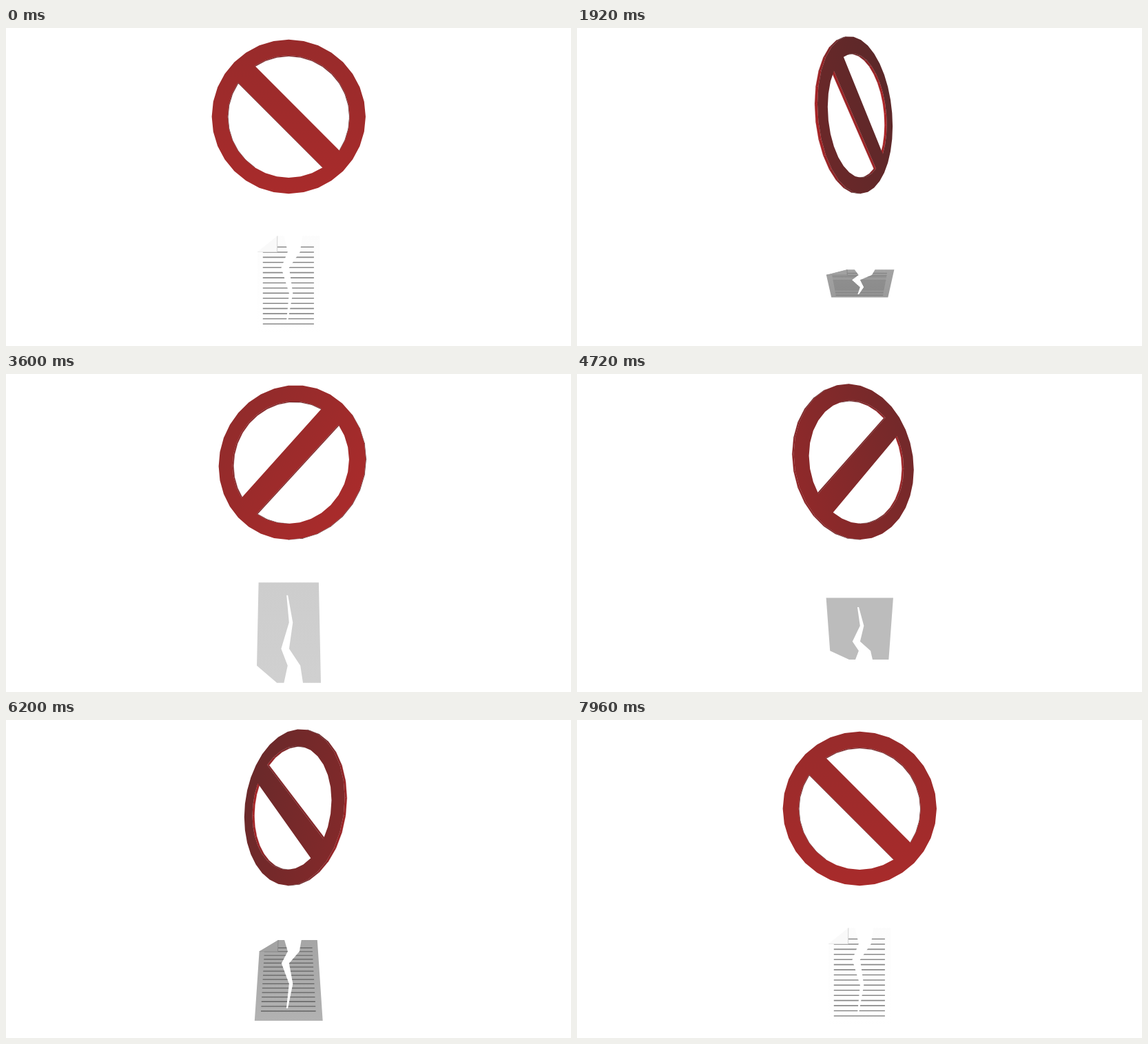
Write an HTML page with a canvas that moves like this. It is 820x461 px and loops after 8 s.

```html
<!DOCTYPE html>
<html lang="en">
<head>
<meta charset="utf-8">
<title>Forbidden sign and torn page</title>
<style>
html, body { margin: 0; width: 100%; height: 100%; overflow: hidden; background: #fff; }
canvas { display: block; width: 820px; height: 461px; }
</style>
</head>
<body>
<canvas id="stage" width="820" height="461"></canvas>
<script>
const ctx = document.getElementById('stage').getContext('2d');
const LOOP = 8000, STEP = 40;
const CX = 410.3, CY = 230.5, DEPTH = 625;
const RAD = Math.PI / 180;

// --- motion: ease in, even speed at the half turn, ease out ---
function ramp(v) {
  const a = 0.39, b = 0.61;
  let lo = 0, hi = 1;
  for (let i = 0; i < 30; i++) {
    const m = (lo + hi) / 2, n = 1 - m;
    if (3 * a * m * n * n + 3 * b * m * m * n + m * m * m < v) lo = m; else hi = m;
  }
  return 3 * b * lo * lo * (1 - lo) + lo ** 3;
}
function turn(ms) {
  const v = 2 * ms / LOOP;
  return v < 1 ? 180 * ramp(v) : 360 - 180 * ramp(2 - v);
}

// --- helpers ---
const project = ([x, y, z]) => {
  const s = DEPTH / (DEPTH - z);
  return [CX + x * s, CY - y * s];
};
const wrap = a => ((a + 540) % 360) - 180;
const rgb = c => `rgb(${c.map(v => Math.max(0, Math.min(255, Math.round(v)))).join()})`;
const gray = v => rgb([v, v, v]);

// keys: [position, ...values]
function lookup(keys, p) {
  let i = 1;
  while (i < keys.length - 1 && p > keys[i][0]) i++;
  const a = keys[i - 1], b = keys[i];
  const f = Math.max(0, Math.min(1, (p - a[0]) / (b[0] - a[0])));
  return a.slice(1).map((v, k) => v + (b[k + 1] - v) * f);
}
function trace(points) {
  points.forEach(([x, y], i) => i ? ctx.lineTo(x, y) : ctx.moveTo(x, y));
  ctx.closePath();
}

// --- sign ---
const R = 111.3, R_IN = 88.3, HALF = 2, SIGN_Y = 101.7;
const arc = (r, from, to) => {
  const pts = [], dir = Math.sign(to - from);
  for (let k = from; k !== to + dir; k += dir) {
    pts.push([r * Math.cos(k * 11.25 * RAD), r * Math.sin(k * 11.25 * RAD)]);
  }
  return pts;
};
const outlines = [arc(R, 0, 31), arc(R_IN, 43, 29), arc(R_IN, 27, 13)];
// face colour by tilt
const FACE = [
  [0, 160, 43, 43], [18, 157, 43, 43], [25, 145, 42, 43],
  [50, 116, 41, 42], [78, 73, 38, 40], [84, 47, 38, 40], [90, 38, 36, 39]
];

function drawSign(deg) {
  const c = Math.cos(deg * RAD), s = Math.sin(deg * RAD);
  const place = (x, y, z) => [x * c + z * s, y + SIGN_Y, z * c - x * s];

  for (const line of outlines) {
    line.forEach((p, i) => {
      const q = line[(i + 1) % line.length];
      const len = Math.hypot(q[0] - p[0], q[1] - p[1]);
      const nx = (q[1] - p[1]) / len, ny = (p[0] - q[0]) / len;
      const [mx, my, mz] = place((p[0] + q[0]) / 2, (p[1] + q[1]) / 2, 0);
      const lit = (-nx * c * mx - ny * my - nx * s * (DEPTH - mz)) / Math.hypot(mx, my, DEPTH - mz);
      if (lit <= 0) return;
      ctx.beginPath();
      trace([place(...p, HALF), place(...q, HALF), place(...q, -HALF), place(...p, -HALF)].map(project));
      ctx.fillStyle = ctx.strokeStyle = rgb([48 + 130 * Math.sqrt(lit), 37, 39]);
      ctx.lineWidth = 0.3;
      ctx.fill();
      ctx.stroke();
    });
  }

  const side = c * DEPTH > HALF ? 1 : c * DEPTH < -HALF ? -1 : 0;
  if (!side) return;
  const base = lookup(FACE, Math.acos(Math.abs(c)) / RAD);
  const gx = -34 * s * c, gy = 8 * Math.abs(c);
  const g = Math.hypot(gx, gy) || 1;
  const ux = gx / g * R, uy = gy / g * R;
  const [ox, oy] = project([0, SIGN_Y, 0]);
  const paint = ctx.createLinearGradient(ox - ux, oy - uy, ox + ux, oy + uy);
  paint.addColorStop(0, rgb([base[0] - g, base[1], base[2]]));
  paint.addColorStop(1, rgb([base[0] + g, base[1], base[2]]));
  ctx.beginPath();
  for (const line of outlines) trace(line.map(p => project(place(...p, HALF * side))));
  ctx.fillStyle = paint;
  ctx.fill('evenodd');
}

// --- page ---
const H = 71, PAGE_Y = -142;
const sheet = [
  [-16.5, H], [-6.7, H], [-1.5, 48], [-10.8, 25], [0.5, -12], [-3.2, -52],
  [-1.2, -52], [6, -12], [0.6, 25], [16.5, 48], [20, H],
  [45.1, H], [45.1, -H], [-45.2, -H], [-45.2, 48]
];
const fold = [[-16.5, H], [-16.8, 48], [-45.2, 48]];
// brightness at the upper and lower edge of the page, by tilt
const FRONT = [
  [-103, 38, 38], [-84, 42, 42], [-50, 165, 178], [-19, 224, 243],
  [0, 252, 255], [25, 255, 237], [55, 190, 180], [78, 90, 85]
];
const BACK = [
  [-103, 40, 40], [-77, 56, 56], [-48, 146, 146], [-18, 207, 204],
  [0, 224, 222], [25, 214, 214], [55, 160, 160], [78, 60, 60]
];

function drawPage(deg) {
  const c = Math.cos(deg * RAD), s = Math.sin(deg * RAD);
  const at = ([x, y]) => project([x, PAGE_Y + y * c, y * s]);
  const front = c * DEPTH + s * PAGE_Y > 0;
  const [top, low] = front ? lookup(FRONT, wrap(deg)) : lookup(BACK, wrap(deg - 180));

  const paint = ctx.createLinearGradient(0, at([0, H])[1], 0, at([0, -H])[1]);
  paint.addColorStop(0, gray(top));
  paint.addColorStop(1, gray(low));
  ctx.beginPath();
  trace(sheet.map(at));
  ctx.fillStyle = paint;
  ctx.fill();
  if (!front) return;

  ctx.save();
  ctx.clip();
  const light = (top + low) / 510;
  ctx.fillStyle = gray(138 * light + 20 * (1 - light));
  for (let i = 0; i < 16; i++) {
    const y = 55 - i * 7.43, left = i ? -37.5 : -17;
    ctx.beginPath();
    trace([[left, y + 0.8], [36.6, y + 0.8], [36.6, y - 0.8], [left, y - 0.8]].map(at));
    ctx.fill();
  }
  ctx.restore();

  const [a, b, d] = fold.map(at);
  ctx.beginPath();
  trace([a, b, d]);
  ctx.fillStyle = gray(top - 3 * light);
  ctx.fill();
  const crease = (p, q, v) => {
    ctx.beginPath();
    ctx.moveTo(...p);
    ctx.lineTo(...q);
    ctx.strokeStyle = gray(v);
    ctx.lineWidth = 0.8;
    ctx.stroke();
  };
  crease(a, b, top * 0.8);
  crease(b, d, top * 0.92);
}

// --- loop ---
const start = performance.now();
function tick() {
  const now = performance.now() - start;
  const step = Math.floor((now % LOOP) / STEP) + 1;
  const deg = turn(step * STEP);
  ctx.fillStyle = '#fff';
  ctx.fillRect(0, 0, 820, 461);
  drawSign(deg);
  drawPage(deg);
  requestAnimationFrame(tick);
}
tick();
</script>
</body>
</html>
```
